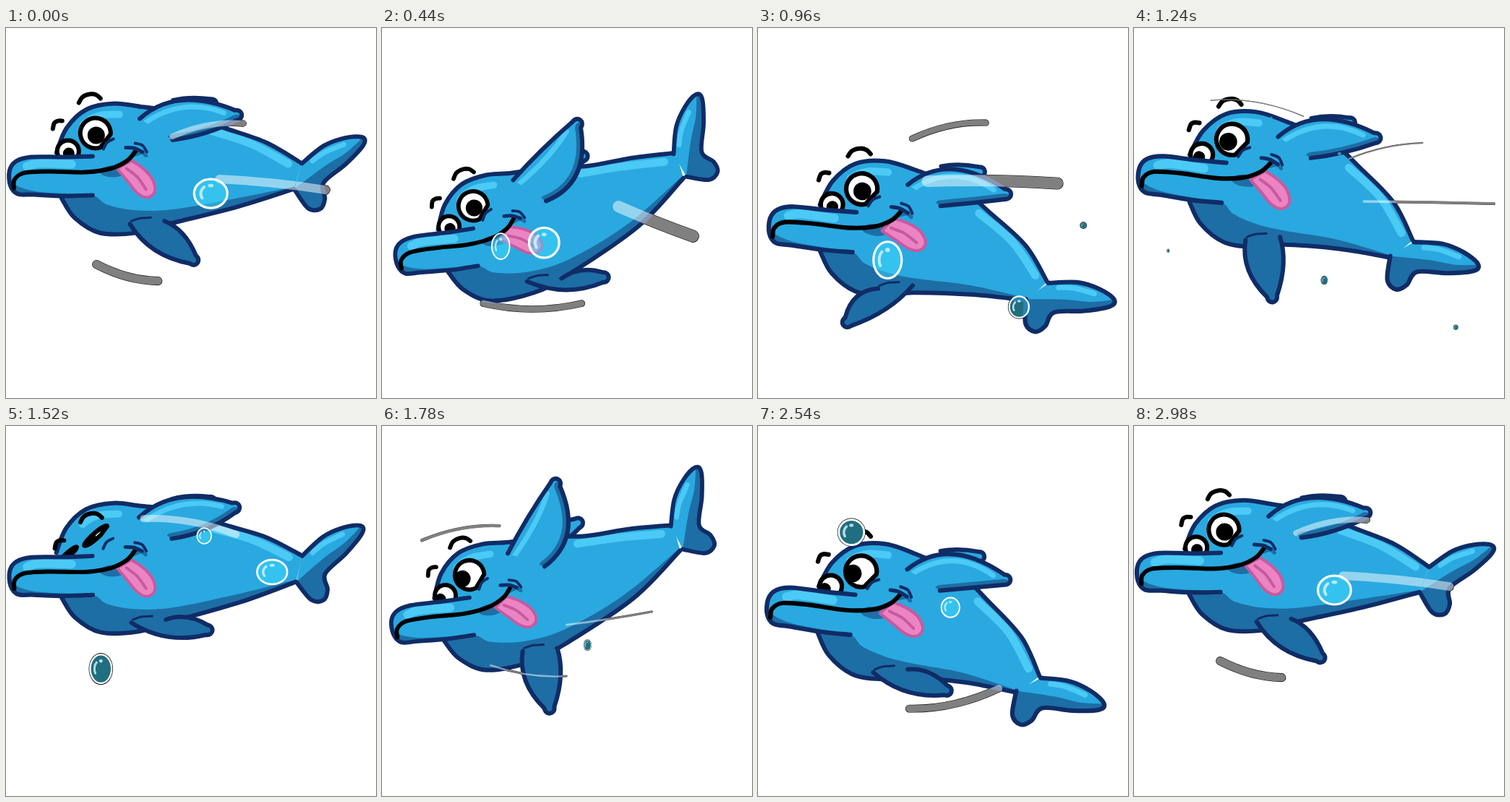
Write an HTML page with a canvas that moves like this. It is 512x512 px and loops after 3 s.

```html
<!DOCTYPE html>
<html>
<head>
<meta charset="utf-8">
<style>
html, body { margin: 0; height: 100%; overflow: hidden; background: #fff; }
canvas { display: block; width: 512px; height: 512px; }
</style>
</head>
<body>
<canvas id="stage" width="512" height="512"></canvas>
<script>
const g = document.getElementById('stage').getContext('2d');
const LOOP = 3000, SWIM = 1500, BEAT = 500, RAD = Math.PI / 180;
const BLUE = '#29a9e0', DARK = '#1d6ea5', NAVY = '#102c66', LIGHT = '#4ccaf6';

// Joints of the resting dolphin; the whole body bends from the eye to the tail stem
const EYE = [124, 145], STEM = [403, 207], FIN_ROOT = [208, 140], FLIPPER_ROOT = [195, 269];

// One value per beat, eased in between
const FIN = [-10, -56, 0, -14, -106, 0];
const FLIPPER = [39, -4, 146, 8, 130, 19];
const LOOK = [0, 0, 0, -12, -12, -12];

// Per beat: x, y, dx, dy, width
const STREAKS = [
  [[230,150, 98,-18, 8], [295,209, 147,15, 12], [125,327, 85,23, 11]],
  [[345,253, 103,41, 17], [158,387, 136,0, 9]],
  [[225,157, 102,-22, 8], [246,216, 180,3, 16]],
  [[184,126, 128,22, 10]],
  [[121,180, 107,-20, 12], [321,297, 118,-18, 8], [216,353, 105,15, 7]],
  [[197,387, 124,-28, 10]]];
// Per beat: x, y, radii
const BUBBLES = [
  [[283,229, 23,20]],
  [[182,308, 13,19], [242,303, 22,22]],
  [[191,325, 20,26], [373,390, 14,15], [462,277, 4,4]],
  [[125,334, 15,20], [268,150, 10,11], [362,200, 21,17]],
  [[350,325, 15,21]],
  [[117,143, 18,18], [254,247, 13,14]]];

const clamp = v => Math.min(1, Math.max(0, v));
const pairs = (...n) => n.flatMap((v, i) => i % 2 ? [] : [[v, n[i + 1]]]);
const add = (p, d, k = 1) => [p[0] + d[0] * k, p[1] + d[1] * k];
const lerp = (a, b, k) => [a[0] + (b[0] - a[0]) * k, a[1] + (b[1] - a[1]) * k];
const polar = deg => [Math.cos(deg * RAD), Math.sin(deg * RAD)];
const onBeat = (list, t) => {
  const i = Math.floor(t / BEAT), a = list[i], b = list[(i + 1) % list.length];
  return a + (b - a) * (1 - Math.cos(Math.PI * (t / BEAT - i))) / 2;
};

let pose;
function setPose(t) {
  const w = 2 * Math.PI * t / SWIM, bend = -Math.sin(w);
  pose = {
    at: [132 + 11.7 * Math.sin(w - 2.37), 205 + 65 * Math.sin(w - 1.16)],
    turn: 7.5 * bend,
    curl: 31 * bend - 1,
    fluke: 48 * bend - 2,
    tongue: 14 * (Math.cos(w) - 1),
    size: 1 + .035 * bend
  };
}
// Bends a resting point along an arc that starts at the eye
function warp([px, py]) {
  const { at, turn, curl, size } = pose;
  const s = px - EYE[0], k = Math.max(0, s) / (STEM[0] - EYE[0]) * curl;
  const along = polar(turn + k / 2), across = polar(turn + k + 90);
  return add(add(at, along, s * size), across, (py - EYE[1]) * size);
}
const warped = (...n) => pairs(...n).map(warp);

// Draws resting shapes rigidly, moved and turned about one joint
function attached(joint, to, angle, size, draw) {
  g.save();
  g.translate(...to);
  g.rotate(angle * RAD);
  g.scale(size, size);
  g.translate(-joint[0], -joint[1]);
  draw();
  g.restore();
}

// Smooth curve through points
function curve(p, joined) {
  joined ? g.lineTo(...p[0]) : g.moveTo(...p[0]);
  for (let i = 0; i < p.length - 1; i++) {
    const a = p[i], b = p[i + 1], before = p[i - 1] || a, after = p[i + 2] || b;
    g.bezierCurveTo(a[0] + (b[0] - before[0]) / 6, a[1] + (b[1] - before[1]) / 6,
      b[0] - (after[0] - a[0]) / 6, b[1] - (after[1] - a[1]) / 6, ...b);
  }
}
function paint(fill, stroke, width) {
  if (fill) { g.fillStyle = fill; g.fill(); }
  if (stroke) { g.strokeStyle = stroke; g.lineWidth = width; g.stroke(); }
}
function line(points, color, width) {
  g.beginPath();
  curve(points);
  paint(null, color, width);
}
function area(fill, ...curves) {
  g.beginPath();
  curves.forEach((c, i) => curve(c, i));
  paint(fill);
}
function oval(x, y, rx, ry, fill, stroke, width) {
  g.beginPath();
  g.ellipse(x, y, rx, ry, 0, 0, 7);
  paint(fill, stroke, width);
}

// Leaf shape on a root line, bulging by front and back
function limb(root, rootAngle, half, angle, length, front, back, fill, glossy) {
  const r = polar(rootAngle), d = polar(angle), n = polar(angle - 90);
  const a = add(root, r, -half), b = add(root, r, half);
  const tip = add(root, d, length), neck = add(tip, d, -9);
  const ta = add(neck, n, 7), tb = add(neck, n, -7);
  const ca = add(add(lerp(a, ta, .5), n, front), d, -front * .2);
  const cb = add(lerp(b, tb, .5), n, -back);
  const outline = () => {
    g.beginPath();
    g.moveTo(...a);
    g.quadraticCurveTo(...ca, ...ta);
    g.bezierCurveTo(...add(ta, d, 11), ...add(tb, d, 11), ...tb);
    g.quadraticCurveTo(...cb, ...b);
  };
  outline();
  paint(fill);
  if (glossy) {
    g.save();
    g.clip();
    g.beginPath();
    g.moveTo(...tb);
    g.quadraticCurveTo(...cb, ...b);
    paint(null, DARK, 16);
    g.beginPath();
    g.moveTo(...lerp(a, b, .18));
    g.quadraticCurveTo(...lerp(ca, cb, .22), ...lerp(ta, root, .14));
    paint(null, LIGHT, 7);
    g.restore();
  }
  outline();
  paint(null, NAVY, 6);
}

function drawTail() {
  const fluke = pairs(409,190, 440,167, 470,157, 494,157, 495,168, 470,193, 438,218,
    439,240, 432,254, 415,252, 397,225);
  area(BLUE, fluke);
  area(DARK, pairs(494,158, 470,178, 439,196, 397,225), fluke.slice(3).reverse());
  line(pairs(424,187, 441,176, 468,166), LIGHT, 7);
  line(fluke, NAVY, 6);
}

function drawBody(t) {
  const fin = onBeat(FIN, t), finRoot = warp(FIN_ROOT), flipRoot = warp(FLIPPER_ROOT);
  const top = warped(70,172, 84,138, 112,112, 150,104, 190,109, 250,118, 300,138, 360,160, 409,190);
  const belly = warped(397,225, 320,248, 225,271, 180,283, 130,283, 95,262, 77,235);

  limb(add(finRoot, [30, -29]), 60, 13, fin * .35 - 4, 55, 5, 5, BLUE);
  area(BLUE, top, belly);
  area(DARK, warped(77,228, 120,231, 140,244, 180,252, 230,251, 310,238, 397,222), belly);
  line(warped(285,143, 340,162, 390,190), LIGHT, 11);
  line(top, NAVY, 6);
  line(belly, NAVY, 6);
  attached(STEM, warp(STEM), pose.fluke, pose.size, drawTail);

  limb(flipRoot, 175, 24, onBeat(FLIPPER, t), 90, 14, 22, DARK);
  line(pairs(-22,-2, -10,-6, 5,-7).map(p => add(flipRoot, p)), NAVY, 3);
  const raised = clamp(-fin / 54);
  limb(finRoot, 33 + Math.min(0, fin + 54) * .9, 27, fin, 121,
    50 - 46 * raised, 45 * raised, BLUE, true);
}

function eye(x, y, r, pupil, look, shut, from, to) {
  const rim = () => {
    g.save();
    g.translate(x + shut, y + shut * 4);
    g.rotate(-.7 * shut);
    g.scale(1, 1 - .82 * shut);
    g.beginPath();
    g.arc(0, 0, r, from, to);
    g.closePath();
    g.restore();
  };
  rim();
  paint('#fff');
  g.save();
  g.clip();
  oval(x + 1 + look * r / 21, y + 3 - look * .1, pupil, pupil, '#000');
  g.restore();
  rim();
  paint(null, '#000', 6);
}

function drawTongue() {
  g.beginPath();
  curve(pairs(154,194, 168,211, 182,228, 196,234, 206,226, 203,209, 190,194, 174,183));
  g.closePath();
  paint('#ec83c3', '#c75a9f', 4);
  line(pairs(167,194, 182,206, 194,223), '#c75a9f', 4);
}

function drawHead(t) {
  const shut = clamp(2 - Math.abs(t - 1520) / 70), look = onBeat(LOOK, t);
  line(pairs(107,133, 118,125, 133,120, 157,119), LIGHT, 10);
  eye(86, 170, 15, 8, look, shut, 0, 7);
  eye(...EYE, 21, 12, look, shut, 1.25, 6.35);
  line(pairs(135,167, 140,158, 149,153), NAVY, 4);

  // Brows drop while blinking
  const brow = p => line(p.map(q => add(q, [3, 27], shut)), '#000', 6);
  brow(pairs(101,103, 106,95, 116,91, 125,92, 131,97));
  brow(pairs(65,139, 67,131, 72,128, 78,128));

  const beak = pairs(120,177, 80,178, 35,178, 14,184, 5,197, 6,217, 16,229, 38,230, 80,232, 120,231);
  area(BLUE, beak);
  area(DARK, pairs(6,212, 20,220, 45,226, 90,229, 120,231), pairs(38,230, 16,229, 6,217));
  line(pairs(29,191, 42,187, 65,187, 91,188), LIGHT, 12);
  line(beak, NAVY, 6);

  oval(148, 198, 18, 8, DARK);
  const mouth = [166, 190];
  attached(mouth, mouth, pose.tongue, 1, drawTongue);
  line(pairs(178,175, 188,172, 194,176), DARK, 5);
  line(pairs(11,221, 12,209, 25,200, 60,198, 110,199, 145,194, 168,183, 180,169), '#000', 6);
  line(pairs(166,165, 178,166, 189,171), NAVY, 5);
  line(pairs(179,159, 189,162, 195,171), NAVY, 4);
}

// Effects drift right, swelling on their beat and fading away
function eachEffect(beats, t, draw) {
  beats.forEach((items, i) => {
    const dt = (t - i * BEAT + LOOP * 1.5) % LOOP - LOOP / 2;
    if (Math.abs(dt) >= 280) return;
    const swell = Math.cos(dt / 280 * Math.PI / 2);
    for (const [x, y, ...shape] of items) draw(swell, x + dt * .3, y + dt * .1, ...shape);
  });
}
function drawEffects(t) {
  const streaks = (color, edge) => eachEffect(STREAKS, t, (swell, x, y, dx, dy, w) => {
    const bow = (y + dy / 2 - 250) * .12;
    g.beginPath();
    g.moveTo(x, y);
    g.quadraticCurveTo(x + dx / 2, y + dy / 2 + bow, x + dx, y + dy);
    paint(null, color, (w + edge) * swell);
  });
  streaks('rgba(255,255,255,.5)', 0);
  eachEffect(BUBBLES, t, (swell, x, y, rx, ry) => {
    rx *= swell;
    ry *= swell;
    const r = Math.min(rx, ry);
    oval(x, y, rx, ry, 'rgba(64,220,255,.5)', r > 5 ? '#fff' : 'rgba(150,235,255,.6)', r * .16);
    g.beginPath();
    g.ellipse(x, y, rx * .6, ry * .6, 0, 2.6, 4);
    paint(null, 'rgba(215,245,255,.8)', r * .2);
    oval(x, y - ry * .55, rx * .17, ry * .12, 'rgba(215,245,255,.8)');
  });
  // Dark backing shows only where nothing lies behind an effect
  g.globalCompositeOperation = 'destination-over';
  streaks('#000', 1.2);
  eachEffect(BUBBLES, t, (swell, x, y, rx, ry) =>
    oval(x, y, (rx * 1.08 + .7) * swell, (ry * 1.08 + .7) * swell, '#000'));
  g.globalCompositeOperation = 'source-over';
}

function frame() {
  const t = performance.now() % LOOP;
  setPose(t);
  g.clearRect(0, 0, 512, 512);
  g.lineCap = g.lineJoin = 'round';
  drawBody(t);
  attached(EYE, pose.at, pose.turn, pose.size, () => drawHead(t));
  drawEffects(t);
  requestAnimationFrame(frame);
}
frame();
</script>
</body>
</html>
```
